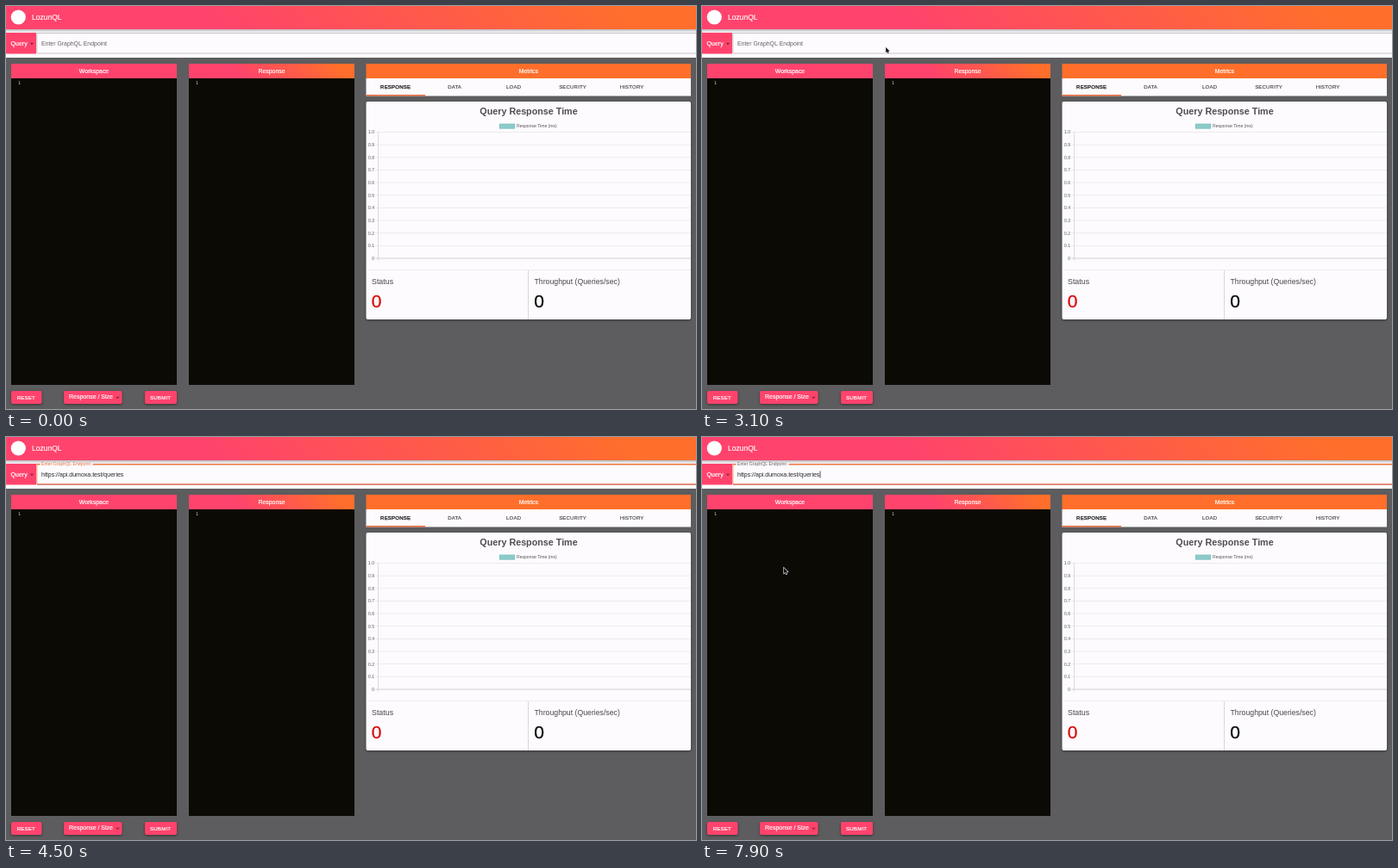
Recreate the animation shown at these times as an HTML page with a canvas. Size 800 by 468 pixels, loop 8 s.

```html
<!DOCTYPE html>
<html lang="en">
<head>
<meta charset="utf-8">
<title>Query dashboard</title>
<style>
html, body { margin: 0; width: 100%; height: 100%; overflow: hidden; background: #5d5c5e; }
canvas { display: block; width: 800px; height: 468px; }
</style>
</head>
<body>
<canvas id="stage"></canvas>
<script>
const W = 800, H = 468, LOOP = 8000, STEP = 100;
const PINK = '#ff436c', ORANGE = '#ff6f2b', PAPER = '#fdfbfe';
const SANS = '"Liberation Sans", Arial, sans-serif';
const MONO = '"DejaVu Sans Mono", "Liberation Mono", monospace';
const LABEL = 'Enter GraphQL Endpoint';
const ADDRESS = 'https://api.dumoxa.test/queries';

// Moments of the interaction, in ms
const FOCUS = 3593, PASTE = 4000, BLUR = 4900, REFOCUS = 7890;

const canvas = document.getElementById('stage');
const dpr = window.devicePixelRatio || 1;
canvas.width = W * dpr;
canvas.height = H * dpr;
const c = canvas.getContext('2d');
c.scale(dpr, dpr);

const clamp = v => Math.max(0, Math.min(1, v));
const mix = (a, b, p) => a + (b - a) * p;
const mixRgb = (a, b, p) => `rgb(${a.map((v, i) => Math.round(mix(v, b[i], p)))})`;

function box(x, y, w, h, fill) {
  c.fillStyle = fill;
  c.fillRect(x, y, w, h);
}

function text(str, x, y, size, color, o = {}) {
  c.font = `${o.weight || 400} ${size}px ${o.font || SANS}`;
  c.letterSpacing = (o.gap || 0) + 'px';
  c.textAlign = o.align || 'left';
  c.textBaseline = 'alphabetic';
  c.fillStyle = color;
  c.fillText(str, x, y);
  if (o.thick) {
    c.strokeStyle = color;
    c.lineWidth = o.thick;
    c.strokeText(str, x, y);
  }
}

function shadowed(x, y, w, h, r, fill, blur) {
  c.save();
  c.shadowColor = 'rgba(0,0,0,.45)';
  c.shadowBlur = blur * dpr;
  c.shadowOffsetY = dpr;
  c.fillStyle = fill;
  c.beginPath();
  c.roundRect(x, y, w, h, r);
  c.fill();
  c.restore();
}

// Diagonal gradient running from the lower left corner to the upper right
function blend(x, y, w, h) {
  const d = (w + h) / 4, cx = x + w / 2, cy = y + h / 2;
  const g = c.createLinearGradient(cx - d, cy + d, cx + d, cy - d);
  g.addColorStop(0.3, PINK);
  g.addColorStop(0.9, ORANGE);
  return g;
}

function arrowDown(x, y) {
  c.fillStyle = 'rgba(70,20,40,.6)';
  c.beginPath();
  c.moveTo(x - 2.3, y - 1);
  c.lineTo(x + 2.3, y - 1);
  c.lineTo(x, y + 1.4);
  c.fill();
}

function panelHead(title, x, w, fill) {
  box(x, 67, w, 17, fill);
  text(title, x + w / 2, 77.5, 6.9, '#fff', { align: 'center', thick: 0.2 });
}

function editor(x, gutter) {
  box(x, 84, 192, 356, gutter ? '#090b05' : '#0b0a05');
  if (gutter) box(x, 84, 12.5, 356, '#23261f');
  text('1', x + 9.6, 90.8, 5, '#d6d6ce', { align: 'center', font: MONO });
}

function button(label, x, w, tx, size, gap) {
  shadowed(x, 447, w, 15, 2, PINK, 3);
  text(label, tx, size > 6.5 ? 456.4 : 456.8, size, '#fff', { gap, thick: 0.2 });
}

function topBar() {
  box(0, 27, W, 33, PAPER);
  const g = c.createLinearGradient(0, 27, 0, 31);
  g.addColorStop(0, '#b9b5b9');
  g.addColorStop(1, PAPER);
  box(0, 27, W, 4, g);
  box(0, 0, W, 27, blend(0, 0, W, 27));
  c.fillStyle = '#fff';
  c.beginPath();
  c.arc(14.3, 13, 8.6, 0, Math.PI * 2);
  c.fill();
  text('LozunQL', 30, 16.2, 8.5, '#fff', { thick: 0.15 });
}

function endpointField(t) {
  const focused = (t >= FOCUS && t < BLUR) || t >= REFOCUS;
  const filled = t >= PASTE;
  const p = 1 - Math.pow(1 - clamp((t - FOCUS) / 200), 3);
  const gap = clamp((p - 0.3) / 0.7) * 61;

  const line = focused ? '#f0773f' : '#b9b7ba';
  const thick = focused ? 1.5 : 0.8;
  box(36, 31, W - 36, thick, line);
  box(36, 55 - thick / 2, W - 36, thick, focused ? '#dc6a55' : line);
  box(35.5, 31, 0.8, 24, line);
  if (gap) box(39.5, 30.5, gap, 2.5, PAPER);

  box(0, 31, 35, 24.5, PINK);
  text('Query', 5.6, 45.5, 7, '#fff', { thick: 0.2 });
  arrowDown(30, 43.8);

  const grey = [100, 98, 102], warm = [229, 112, 62];
  const heat = t < BLUR ? clamp((t - FOCUS - 30) / 170)
    : t < REFOCUS ? 1 - clamp((t - BLUR) / 200) : clamp((t - REFOCUS - 30) / 170);
  text(LABEL, 41, mix(45.5, 33.2, p), mix(6.92, 5.18, p), mixRgb(grey, warm, heat));

  let caretX = 41;
  if (filled) {
    text(ADDRESS, 41, 45.5, 7, '#222');
    caretX += c.measureText(ADDRESS).width + 0.3;
  }
  const since = t >= REFOCUS ? t - REFOCUS : filled ? t - PASTE : t - FOCUS;
  if (focused && since % 1000 < 500) box(caretX, 39.5, 0.8, 8, '#222');
}

function metrics() {
  const x = 417.5, w = 376.5;
  panelHead('Metrics', x, w, ORANGE);
  box(x, 84, w, 20.5, PAPER);
  ['RESPONSE', 'DATA', 'LOAD', 'SECURITY', 'HISTORY'].forEach((name, i) =>
    text(name, 451.6 + i * 68.5, 96.3, 6.05, i ? '#333' : '#111',
      { align: 'center', gap: 0.17, thick: i ? 0.1 : 0.25 }));
  box(x, 103, 68.5, 1.5, '#e9673c');

  shadowed(x, 111, w, 253, 2, PAPER, 3);
  text('Query Response Time', 606, 125.6, 10.75, '#4f4d51', { align: 'center', weight: 700 });
  box(572, 136.8, 18, 5.6, '#8ccbca');
  c.strokeStyle = '#78bebd';
  c.lineWidth = 0.7;
  c.strokeRect(572.3, 137.1, 17.4, 5);
  text('Response Time (ms)', 592, 141.3, 5.07, '#555');

  for (let i = 0; i <= 10; i++) {
    const y = 146.5 + i * 14.65;
    box(428, y - 0.35, 366, 0.7, i === 10 ? '#bebcc0' : '#e6e4e8');
    text(i === 10 ? '0' : (1 - i / 10).toFixed(1), 427, y + 1.8, 5, '#555', { align: 'right' });
  }
  box(431, 146.5, 0.7, 149.5, '#cfcdd1');

  box(x, 306, w, 0.7, '#e9e7eb');
  box(605, 307, 0.8, 57, '#cfcdd1');
  text('Status', 424, 323.1, 8.85, '#48464a');
  text('Throughput (Queries/sec)', 612.5, 323.1, 8.72, '#48464a');
  text('0', 423.8, 349.6, 21, '#dc0a0a', { thick: 0.3 });
  text('0', 612.2, 349.6, 21, '#0a0a0a', { thick: 0.3 });
}

function pointer(x, y) {
  c.beginPath();
  c.moveTo(x, y);
  c.lineTo(x, y + 6.2);
  c.lineTo(x + 1.4, y + 5);
  c.lineTo(x + 2.4, y + 7.2);
  c.lineTo(x + 3.4, y + 6.8);
  c.lineTo(x + 2.5, y + 4.7);
  c.lineTo(x + 4.4, y + 4.5);
  c.closePath();
  c.lineWidth = 1.2;
  c.strokeStyle = '#eee';
  c.stroke();
  c.fillStyle = '#111';
  c.fill();
}

function textCursor(x, y) {
  box(x - 0.4, y - 3.3, 0.9, 6.8, '#222');
  box(x - 1.6, y - 3.7, 3.2, 0.7, '#333');
  box(x - 1.6, y + 3.2, 3.2, 0.7, '#333');
}

function mouse(t) {
  if (t >= 3000 && t < PASTE) {
    // Fast entry that slows down over the field
    const left = 1 - clamp((t - 3000) / 450);
    const x = 105.5 + 178 * Math.pow(left, 2);
    const y = 44 + 11 * Math.pow(left, 4);
    if (t < 3200) pointer(x, y);
    else textCursor(x, y);
  } else if (t >= 7700) {
    const left = Math.pow(1 - clamp((t - 7700) / 200), 2);
    pointer(95 + 24 * left, 152 + 30 * left);
  }
}

function draw(t) {
  box(0, 0, W, H, '#5d5c5e');
  topBar();
  endpointField(t);
  const gutter = t >= 3500 && t < 3800;
  panelHead('Workspace', 6, 192, PINK);
  editor(6, gutter);
  panelHead('Response', 212, 192, blend(212, 67, 192, 17));
  editor(212, gutter);
  metrics();
  button('RESET', 6, 35.5, 12.7, 6.1, 0.2);
  button('Response / Size', 67, 67.5, 73, 7, 0);
  arrowDown(129.5, 454.8);
  button('SUBMIT', 161, 37, 167, 6.1, 0.2);
  mouse(t);
}

const start = performance.now();
function tick() {
  const t = (performance.now() - start) % LOOP;
  draw(Math.floor(t / STEP) * STEP);
  requestAnimationFrame(tick);
}
tick();
</script>
</body>
</html>
```
